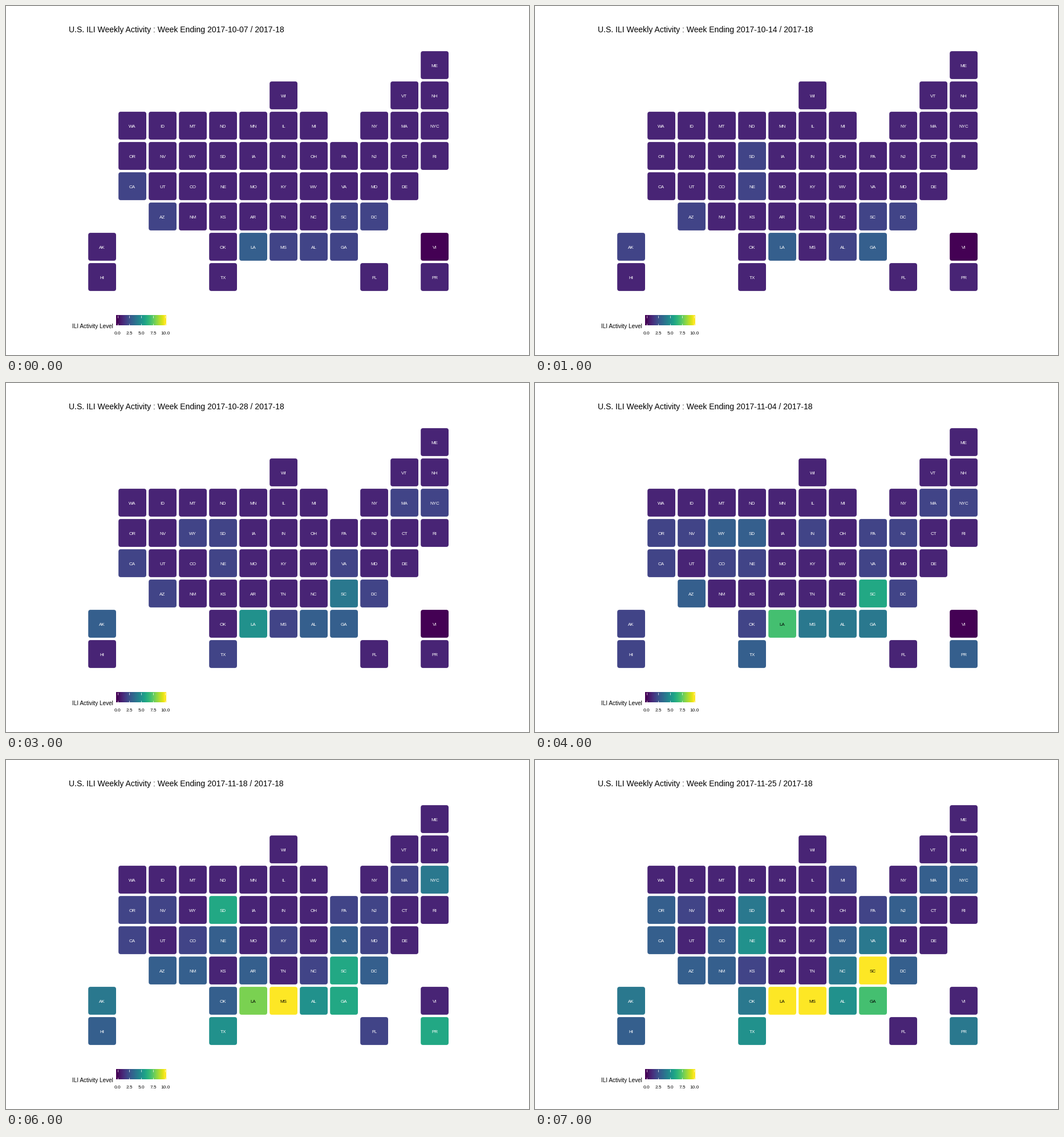
Write a matplotlib script that moves like this. It is 917 px wide and 611 px high and loops after 8 s.

```python
import numpy as np
import matplotlib.pyplot as plt
from matplotlib.animation import FuncAnimation
from matplotlib.patches import FancyBboxPatch

W, H, DPI = 917, 611, 64
CMAP = plt.get_cmap("viridis")
PITCH, TILE, RADIUS = 53, 48.8, 4
X0, Y0 = 168.6, 103.5  # centre of the top left cell

GRID = """
.  .  .  .  .  .  .  .  .  .  .  ME
.  .  .  .  .  .  WI .  .  .  VT NH
.  WA ID MT ND MN IL MI .  NY MA NYC
.  OR NV WY SD IA IN OH PA NJ CT RI
.  CA UT CO NE MO KY WV VA MD DE .
.  .  AZ NM KS AR TN NC SC DC .  .
AK .  .  .  OK LA MS AL GA .  .  VI
HI .  .  .  TX .  .  .  .  FL .  PR
"""

# Activity levels by week; states not listed are at level 1.
WEEKS = [
    ("10-07", {0: "VI", 2: "CA AZ SC DC MS AL GA", 3: "LA"}),
    ("10-14", {0: "VI", 2: "AK AZ SC DC AL SD NE", 3: "LA GA"}),
    ("10-21", {0: "VI", 2: "NYC SD NE VA SC DC AL", 3: "GA", 4: "AK LA"}),
    ("10-28", {0: "VI", 2: "NYC MA SD NE VA WY AZ CA DC TX MS",
               3: "AK AL GA", 4: "SC", 5: "LA"}),
    ("11-04", {0: "VI", 2: "MA NYC OR NV IN PA NJ CA CO NE VA DC AK OK HI",
               3: "WY SD AZ TX PR", 4: "MS AL GA", 6: "SC", 7: "LA"}),
    ("11-11", {0: "VI", 2: "MI MA NYC OR NV WY PA NJ CA CO NM AK FL",
               3: "NE VA AZ DC OK HI TX PR", 4: "SD AL", 5: "GA",
               6: "SC", 7: "LA", 8: "MS"}),
    ("11-18", {2: "MA OR NV PA NJ CA CO KY MD NC FL",
               3: "NE VA AZ NM AR DC OK HI", 4: "NYC AK", 5: "AL TX",
               6: "SD SC GA PR", 8: "LA", 10: "MS"}),
    ("11-25", {2: "MI NV PA KS", 3: "OR CA CO AZ NM WV MA NYC NJ DC HI",
               4: "SD VA NC OK AK PR", 5: "NE AL TX", 7: "GA",
               10: "LA MS SC"}),
]

plt.rcParams["font.family"] = "Liberation Sans"
fig = plt.figure(figsize=(W / DPI, H / DPI), dpi=DPI, facecolor="white")
ax = fig.add_axes([0, 0, 1, 1])


def put_text(x, y, s, px, **kw):
    """Text with its baseline at y and its size in pixels."""
    return ax.text(x, y, s, fontsize=px * 72 / DPI, va="baseline", **kw)


def add_tile(name, col, row):
    x, y = X0 + PITCH * col, Y0 + PITCH * row
    box = FancyBboxPatch((x - TILE / 2, y - TILE / 2), TILE, TILE, lw=0,
                         boxstyle=f"round,pad=0,rounding_size={RADIUS}")
    ax.add_patch(box)
    return box, put_text(x, y + 3.5, name, 8, ha="center")


def draw_legend():
    left, right, top, bottom = 193.3, 281.3, 542, 559.3
    ax.imshow(np.linspace(0, 10, 20)[None, :], cmap=CMAP, aspect="auto",
              extent=(left, right, bottom, top), interpolation="bilinear")
    for level in np.arange(0, 10.1, 2.5):
        x = 195.5 + 8.36 * level
        for y, end in ((top, top + 3.5), (bottom, bottom - 3.5)):
            ax.plot([x, x], [y, end], color="white", lw=0.8,
                    solid_capstyle="butt")
        put_text(x, 575, f"{level:.1f}", 8.2, ha="center")
    put_text(116, 564, "ILI Activity Level", 10)


draw_legend()
title = put_text(110, 45.7, "", 14)
tiles = {name: add_tile(name, col, row)
         for row, line in enumerate(GRID.strip().splitlines())
         for col, name in enumerate(line.split()) if name != "."}
ax.set_xlim(0, W)
ax.set_ylim(H, 0)
ax.axis("off")


def update(i):
    day, groups = WEEKS[i]
    title.set_text(f"U.S. ILI Weekly Activity : Week Ending 2017-{day} / 2017-18")
    levels = {s: lv for lv, names in groups.items() for s in names.split()}
    for name, (box, label) in tiles.items():
        level = levels.get(name, 1)
        box.set_facecolor(CMAP(level / 10))
        label.set_color("black" if level > 6 else "white")
    return []


anim = FuncAnimation(fig, update, frames=len(WEEKS), interval=1000,
                     init_func=lambda: update(0), repeat=True, repeat_delay=0)
plt.show()
```
